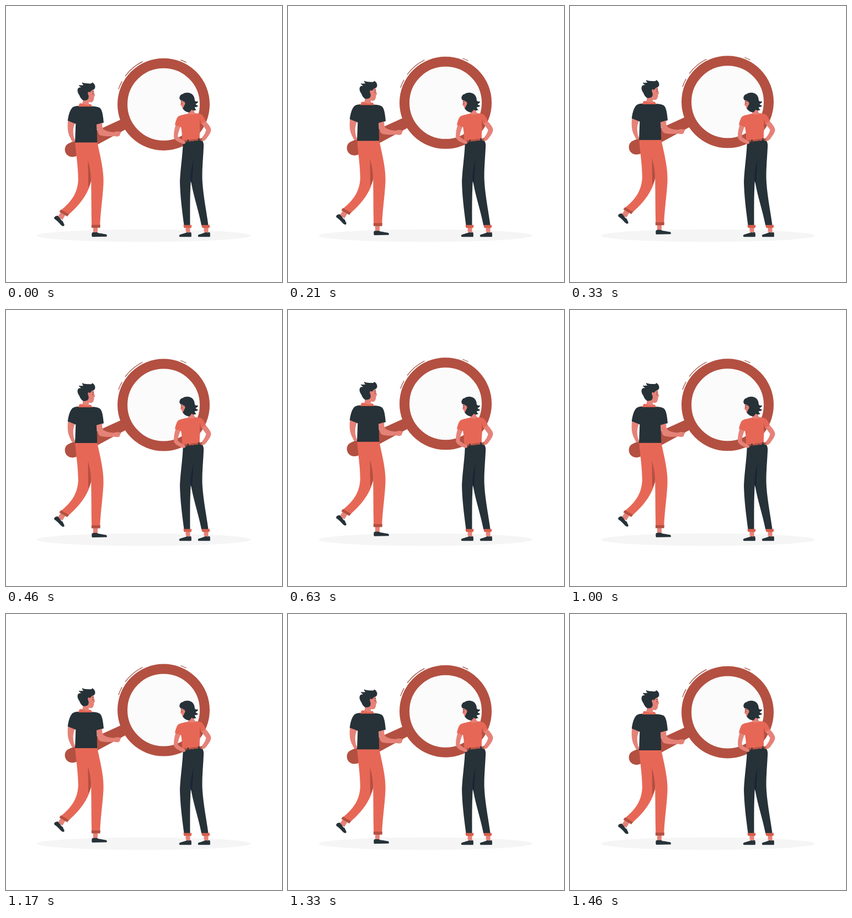
An HTML page that plays this animation: 500x500 px, repeating every 1.5 s.

```html
<!DOCTYPE html>
<html lang="en">
<head>
<meta charset="utf-8">
<title>Searching together</title>
<style>
  html, body { margin: 0; width: 100%; height: 100%; overflow: hidden; background: #fff; }
  svg { display: block; width: 100vw; height: 100vh; }
  .dark { fill: #263238; }
  .navy { fill: #18233a; }
  .coral { fill: #e76756; }
  .cuff { fill: #d85f4e; }
  .rust { fill: #b35041; }
  .skin { fill: #e58278; }
  .line { fill: none; stroke: #9d4538; stroke-width: 1.2; stroke-linecap: round; }
  .detail { fill: none; stroke: #263238; stroke-width: .8; stroke-linecap: round; }
</style>
</head>
<body>
<svg viewBox="0 0 500 500">
  <ellipse cx="249.5" cy="416" rx="193.5" ry="11.3" fill="#f5f5f5"/>

  <g id="floating">
    <g id="magnifier">
      <path class="rust" d="M115 248.3L209 205.500L219 222.500L126.500 272.500C119 275.500 110.500 272.500 107.700 265.500C105 258.500 107.500 251 115 248.300Z"/>
      <circle cx="285.500" cy="178.300" r="74.500" fill="#fbfbfb" stroke="#b35041" stroke-width="18"/>
      <path class="line" d="M216.300 126.700A86.300 86.300 0 0 1 247 101M204 150.500A86.300 86.300 0 0 1 210 137M316.800 98A86.300 86.300 0 0 1 326 102"/>
    </g>

    <g id="man">
      <!-- back foot -->
      <path class="skin" d="M99 374L107.500 379L102 388L94 382Z"/>
      <path class="dark" d="M87.300 383.500C88.500 381 91.500 380 94 380.200C97 385 102 387 103 390.500C104 393.500 106.500 396 105.500 398C104.500 399.800 101.500 398.800 99.500 396.800C96 392.500 92 388.500 87.300 385.500Z"/>
      <path d="M98 385.500Q100 388.500 102.500 390L101.500 387Z" fill="#fff"/>
      <!-- front foot -->
      <path class="skin" d="M158 400H166V410.500H158Z"/>
      <path class="dark" d="M156 410.700C160 409.500 164 410.500 167 410.200C171 412.500 176 413 181 413.700C183 414.300 183.500 416.500 182.300 417.800L156 418.300C155 416 155 413 156 410.700Z"/>
      <path d="M165.500 408.500L171.500 412.300L166 411Z" fill="#fff"/>

      <path class="coral" d="M125 245H154V318C148 343 132 362 112 379.500L98.500 371C119 355 130 338 130.800 315C130.800 292 127 270 125 245Z"/>
      <path class="rust" d="M148.500 279C152.500 291 154.500 300 154.200 316Q153 323 149 329Z"/>
      <path class="coral" d="M136 245H165C169 266 178 297 176.500 323C175 349 171.500 371 170.300 397H155.200C154.500 371 154.800 345 154.200 318C154 303 152 292 148 278Z"/>
      <path class="rust" d="M99.500 369L114 377.500L111 381.500L96.500 373Z"/>
      <path class="rust" d="M154.800 396.300H171L170.500 401.800H155Z"/>

      <!-- far arm -->
      <path class="skin" d="M112.500 206L126 211C121.500 219 120.500 227 123.500 240L126 244.500C123 247.500 118.500 246 117.500 241C112 232 110.500 221 112.500 206Z"/>
      <path class="dark" d="M132 181C126 181.300 121 182.500 118.800 186C114.500 192 113 200 111.800 208L126.300 213.700L125 247.300H165.200L164.500 215.200L177 211.500C176 200 174.500 187.500 169.500 184.500C165 182 160 181.800 155 181.800Z"/>

      <!-- near arm -->
      <path class="skin" d="M163.800 215L174.300 212C174 218 174.500 222.500 178 224.500C183 227.500 190 228.500 196 228.700C199 227 204 227.300 208.500 228.500L207 231.800L205.500 235.500C202 237.500 199 236.300 196 235.800C187 236.500 177 236.500 170.500 234.500C165.500 231.500 165.300 223 163.800 215Z"/>

      <path class="coral" d="M133.500 176.500L153.500 178L156.800 182.500H130.800Z"/>
      <path class="skin" d="M139.500 164H150V179.500C146 179.800 142 179 138.200 177.500C139.500 173 140 169 139.500 164Z"/>
      <path class="skin" d="M146 151H158.500C159.300 154.500 159.500 158 161.300 162.500L159.600 164.500C159.500 169 158.500 173 155.500 174.500C152.500 175.300 149 174 146 172Z"/>
      <path class="dark" d="M139.500 171C136.500 169 134.300 166 133 162C129.500 157 128.800 153 130.300 150C131 148 133.500 147.700 136 147.500C133.500 146 132 144.800 132 143.300C136 144.200 138.500 143.300 140.500 143.300C138.800 142 137.800 140.500 138 138.500C141.500 140.500 147 140.600 151 140.600C154 141.200 156 140.200 156 138.500C159.500 140 161.500 143.500 161.500 146.500C161.500 150 159.500 151.500 157 152C154.500 153 153.500 155.500 152 156.500C149 154 147.300 157 148.800 160.500C150.500 164 150 168 147.500 169.800C145 171.300 142 171.500 139.500 171Z"/>
      <path class="detail" d="M156.800 155.500L158.700 155M157.500 158.500V160"/>
    </g>
  </g>

  <g id="woman">
    <!-- feet -->
    <path class="skin" d="M325.500 400H333.500V411H325.500ZM358.500 400H366.500V411H358.500Z"/>
    <path id="shoe" class="dark" d="M335 409.800C331.500 411 329 410.500 326 410C322 412.500 318 413 314.500 414.500C313.500 415.500 313.500 417.500 314.800 418.300H335.500C336.200 415.500 336 412 335 409.800Z"/>
    <use href="#shoe" x="34"/>
    <path d="M326.500 408.500L321 412L327 410.500ZM359.500 408.500L354 412L360 410.500Z" fill="#fff"/>

    <path class="dark" d="M323 246L354.500 242.500C358 246 358.500 251 358 256C357 278 354.500 300 356 321C358 348 363 371 366.500 397H354C349 371 340 346 334.800 316C333 346 333.500 371 333.500 397H322.500C319 371 315.500 344 315 318C316 294 320 270 320.500 251C320.500 248.500 321.500 247 323 246Z"/>
    <path class="navy" d="M339.500 279L337 321L334.600 318C333.500 307 335.500 294 339.500 279Z"/>
    <path class="cuff" d="M321.300 396.800H336.500L335.500 402H322.500ZM354 396.800H369.300L368.500 402H355.500Z"/>

    <!-- arms -->
    <path class="skin" d="M307.800 214L316.500 217.500C313.500 225 311 232 311.500 237C315 240.500 319 242.500 323 244L325.500 247.500C324.500 250.500 320.500 250.500 317.500 248.500C312 246.500 306.500 243.500 304.300 239C303.500 230 305.500 221.500 307.800 214Z"/>
    <path class="skin" d="M353.500 212L361.500 208.500C366 213.500 371.500 219.500 371.500 225C370.500 231.500 365.500 236.500 362.500 241C359.500 244.500 356 245.500 352.500 243.800L355 238.500C358.500 234.500 361.500 229.500 362.500 224.500C360 220.500 356.500 216.500 353.500 212Z"/>
    <path class="coral" d="M329 195.300C322 196.800 315 198 311.500 200.500C308.500 204.500 307 210 306 215.300L317 219.300C318.800 228 319.300 237 318.800 243.500L351 241.500C350.500 232 351.500 222 352.500 214L362 209C360 204 357.500 199 354 196.300C350.500 194.800 347 194.500 343 194.500Z"/>
    <path class="rust" d="M351.500 204L353 214L350.800 220Z"/>
    <path class="rust" d="M324 243.500L355 239.500L355.500 242.500L324 246.500Z"/>
    <path class="dark" d="M328.500 242.300L330.500 242V247H328.500ZM348.300 239.700L350.300 239.400V244.500H348.300Z"/>

    <path class="skin" d="M331 186H340.500C340.200 190 341 193 343.500 195C339 197 333 197 329 195.500C331.500 193 331.800 189.500 331 186Z"/>
    <path class="skin" d="M317 168H327V188C322 188.500 319 186.500 318.500 181.500L316 179.500C317 176 316.800 172 317 168Z"/>
    <path class="dark" d="M314.300 167.500C314 163 317 160 320 159.500C324 156.300 331 156.300 335.500 158.800C340.500 161.800 341.800 167 342 171.500C343.800 173 346 173.200 348.300 172.800C347.300 175.300 345.500 177 343.300 177.800C345 179.500 346.800 180.500 348.500 180.800C346.500 183 343.800 183.500 341.800 183C342.200 185.500 343.300 187.300 345 188.300C341.500 190 338.300 189.500 336.500 187.800C335 190 333.500 192 331.800 192.800C327 192.300 322.300 189.800 320.300 185.500C322 183 322.500 180.500 324 178.500C325.500 176 323.500 172.500 321.500 173C320.500 171 318 170.500 316 170.700Z"/>
    <path class="detail" d="M317.300 172.800L319.200 173.200M318.500 176V177.500"/>
  </g>
</svg>
<script>
  const PERIOD = 1500, RISE = 10, PHASE = 10;
  const floating = document.getElementById("floating");

  // Constant speed up for half the period, then back down.
  function draw(now) {
    const p = ((now + PHASE) % PERIOD) / PERIOD;
    const lift = RISE * (1 - Math.abs(1 - 2 * p));
    floating.setAttribute("transform", `translate(0 ${-lift})`);
    requestAnimationFrame(draw);
  }
  draw(0);
</script>
</body>
</html>
```
